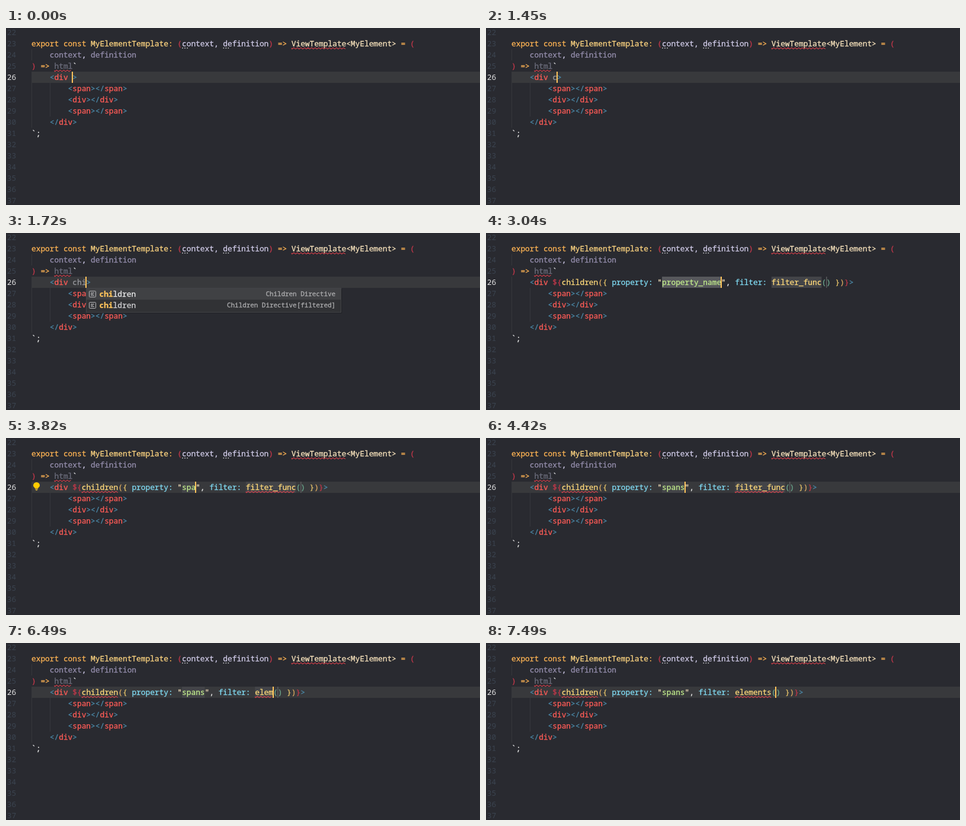
Animation of 800 by 300 pixels, one loop 8 s. Source, as an HTML page:

```html
<!DOCTYPE html>
<html lang="en">
<head>
<meta charset="utf-8">
<title>Snippet completion in a code editor</title>
<style>
  html, body { margin: 0; width: 100%; height: 100%; overflow: hidden; background: #292a30; }
  svg { display: block; }
  text {
    font: 12.83px "Noto Sans Mono", "DejaVu Sans Mono", monospace;
    font-variant-ligatures: none;
    white-space: pre;
  }
  text, tspan { fill: currentColor; stroke: currentColor; stroke-width: 0.3px; }
  .number { stroke: none; }
  .detail { font-size: 10.9px; text-anchor: end; }
</style>
</head>
<body>
<svg id="stage" width="800" height="300" viewBox="0 0 800 300">
  <g id="back"></g>
  <g id="page"></g>
  <g id="live"></g>
</svg>
<script>
const LOOP = 8000;
const LEFT = 43, CHAR = 7.698, ROW = 19, ACTIVE = 26;

const C = {
  number: '#3b4450', white: '#e6e6e6', keyword: '#ffb454', name: '#ffd580', type: '#f9e4bd',
  param: '#d0cbe8', dim: '#968fae', red: '#c2384a', tag: '#ff5c57',
  angle: '#4b89a8', faint: '#6c6d7c', typed: '#96979c', call: '#ffd97a',
  key: '#80dcf4', string: '#c1ec8c', paren: '#d9a860', brace: '#e8c56a',
  inner: '#6ba58c', caret: '#ffc55c', squiggle: '#e5404c'
};

const colX = col => LEFT + col * CHAR;
const rowY = line => 74 + (line - ACTIVE) * ROW;

const rect = (x, y, w, h, fill, more = '') =>
  `<rect x="${x}" y="${y}" width="${w}" height="${h}" fill="${fill}" ${more}/>`;
const escape = s => s.replace(/&/g, '&amp;').replace(/</g, '&lt;').replace(/>/g, '&gt;');

// parts: alternating colour and string
function codeLine(line, col, ...parts) {
  let spans = '';
  for (let i = 0; i < parts.length; i += 2)
    spans += `<tspan color="${C[parts[i]]}">${escape(parts[i + 1])}</tspan>`;
  return `<text x="${colX(col)}" y="${rowY(line) + 14}">${spans}</text>`;
}

function squiggle(line, col, length) {
  const x = colX(col), y = rowY(line) + 16, end = length * CHAR;
  let d = `M${x} ${y + 1}`;
  for (let i = 1, up = false; i < end; i += 3, up = !up)
    d += `L${x + i} ${y + (up ? 0.4 : 2.6)}`;
  return `<path d="${d}" fill="none" stroke="${C.squiggle}" stroke-width="1.1"/>`;
}

const hintDots = (line, col) => [1, 5, 9].map(dx =>
  `<circle cx="${colX(col) + dx}" cy="${rowY(line) + 17}" r="1" fill="#b4b4b8"/>`).join('');

const backing = (col, length, fill) =>
  rect(colX(col), rowY(ACTIVE), length * CHAR, ROW, fill);

function drawPage() {
  let out = '';
  for (let n = 22; n <= 37; n++)
    out += `<text class="number" x="1.7" y="${rowY(n) + 14}" color="${n === ACTIVE ? C.white : C.number}">${n}</text>`;
  out += codeLine(23, 0, 'keyword', 'export const ', 'name', 'MyElementTemplate', 'keyword', ': ',
    'red', '(', 'param', 'context, definition', 'red', ')', 'keyword', ' => ',
    'type', 'ViewTemplate<MyElement>', 'keyword', ' = ', 'red', '(');
  out += hintDots(23, 33) + hintDots(23, 42) + squiggle(23, 57, 12);
  out += codeLine(24, 4, 'dim', 'context', 'param', ', ', 'dim', 'definition');
  out += codeLine(25, 0, 'red', ')', 'keyword', ' => ', 'faint', 'html', 'white', '`') + squiggle(25, 5, 4);
  ['span', 'div', 'span'].forEach((tag, i) => {
    out += codeLine(27 + i, 8, 'angle', '<', 'tag', tag, 'angle', '></', 'tag', tag, 'angle', '>');
  });
  out += codeLine(30, 4, 'angle', '</', 'tag', 'div', 'angle', '>');
  return out + codeLine(31, 0, 'white', '`;');
}

function drawBack(s) {
  const guide = (x, line, rows) => rect(x, rowY(line), 1, rows * ROW, '#36373c');
  const highlight = s.select ? '' : rect(LEFT, 74, 757, ROW, '#38393c');
  return highlight + guide(43, 24, 1) + guide(43, 26, 5) + guide(74, 27, 3);
}

function drawPopup(x, typed, rows, selected) {
  const h = rows.length * ROW + 3;
  let out = rect(x + 1, 95, 431, h, '#000', 'opacity=".25"') +
    rect(x + 0.5, 93.5, 430, h, '#313235', 'stroke="#424347"');
  rows.forEach(([label, detail], i) => {
    const y = 94 + i * ROW;
    if (i === selected) out += rect(x + 1, y, 429, ROW, '#404144');
    out += rect(x + 5.5, y + 4.5, 11, 10, 'none', 'stroke="#bdbdbf" rx="1"') +
      `<path d="M${x + 8} ${y + 7.5}h6M${x + 8} ${y + 9.5}h4M${x + 8} ${y + 11.5}h6" stroke="#bdbdbf"/>`;
    out += `<text x="${x + 22.5}" y="${y + 13.5}" color="${i === selected ? '#ededed' : '#d4d4d6'}">` +
      `<tspan color="${C.caret}" font-weight="700">${label.slice(0, typed)}</tspan>${label.slice(typed)}</text>`;
    out += `<text class="detail" x="${x + 421}" y="${y + 13}" color="#adadaf">${detail}</text>`;
  });
  return out;
}

const bulb = () =>
  `<path d="M48.9 85.5C48.5 83.6 46 83.2 46 80.3A5.5 5.4 0 0 1 57 80.3C57 83.2 54.5 83.6 54.1 85.5Z" fill="#ffcc00"/>` +
  rect(49.2, 86, 4.6, 1.2, '#d8b43c') + rect(50, 87.7, 3, 1.3, '#d8b43c');

const directives = [['children', 'Children Directive'], ['children', 'Children Directive[filtered]']];
const words = ['class', 'click', 'color', 'const', 'content', 'context', 'cursor'].map(w => [w, '']);

function drawLive(s) {
  let out = '', caret;
  if (s.prop === undefined) {
    caret = 9 + s.typed.length;
    out += codeLine(ACTIVE, 4, 'angle', '<', 'tag', 'div ', 'typed', s.typed, 'angle', '>');
  } else {
    const propCol = 33, filterCol = propCol + s.prop.length + 11;
    const filterEnd = filterCol + s.filter.length;
    caret = { prop: propCol + s.prop.length, filter: filterEnd, end: filterEnd + 1 }[s.field];
    if (s.stops) {
      const shade = name => s.select && s.field === name ? '#57585c' : '#434448';
      out += backing(propCol, s.prop.length, shade('prop')) +
        backing(filterCol, s.filter.length, shade('filter')) +
        rect(Math.floor(colX(filterEnd + 1)), 74, 1.5, ROW, '#5a5b5c');
    }
    out += codeLine(ACTIVE, 4, 'angle', '<', 'tag', 'div ', 'red', '${', 'call', 'children',
      'paren', '(', 'brace', '{ ', 'key', 'property: ', 'type', '"', 'string', s.prop, 'type', '"',
      'white', ', ', 'key', 'filter: ', 'call', s.filter, 'inner', '()', 'brace', ' }',
      'paren', ')', 'red', '}', 'angle', '>');
    if (s.errors) out += squiggle(ACTIVE, 11, 8) + squiggle(ACTIVE, filterCol, s.filter.length);
  }
  if (s.caret) out += rect(Math.round(colX(caret)) - 1, 74, 2, ROW, C.caret);
  if (s.bulb) out += bulb();
  if (s.rows) out += drawPopup(Math.round(colX(caret)), s.typed.length, s.rows, s.selected);
  return out;
}

// Each step changes part of the state from its time on.
const steps = [
  [0, { typed: '', caret: true }],
  [260, { caret: false }],
  [720, { caret: true }],
  [1250, { caret: false }],
  [1450, { typed: 'c', caret: true }],
  [1520, { rows: [...directives, ...words], selected: 0 }],
  [1600, { typed: 'ch', rows: directives }],
  [1720, { typed: 'chi' }],
  [2250, { caret: false }],
  [2710, { caret: true, selected: 1 }],
  [3040, { rows: null, prop: 'property_name', filter: 'filter_func', field: 'prop', select: true, stops: true }],
  [3300, { prop: 's', select: false }],
  [3430, { prop: 'sp' }],
  [3560, { errors: true }],
  [3690, { bulb: true }],
  [3820, { prop: 'spa' }],
  [4020, { prop: 'span' }],
  [4150, { prop: 'spans' }],
  [4420, { bulb: false }],
  [4680, { caret: false }],
  [4950, { field: 'filter', select: true, caret: true }],
  [5220, { bulb: true }],
  [5420, { caret: false }],
  [5620, { filter: 'e', select: false, caret: true }],
  [5750, { filter: 'el' }],
  [6020, { bulb: false }],
  [6150, { filter: 'ele' }],
  [6490, { filter: 'elem' }],
  [6690, { filter: 'eleme' }],
  [6800, { filter: 'elemen' }],
  [6910, { filter: 'element' }],
  [7020, { filter: 'elements' }],
  [7420, { field: 'end' }],
  [7490, { stops: false }]
];

const part = id => document.getElementById(id);
let shown = -1;

function render(time) {
  const t = time % LOOP;
  const current = steps.filter(([at]) => at <= t);
  if (current.length === shown) return;
  shown = current.length;
  const state = Object.assign({}, ...current.map(([, change]) => change));
  part('back').innerHTML = drawBack(state);
  part('live').innerHTML = drawLive(state);
}

part('page').innerHTML = drawPage();
const start = performance.now();
function tick() {
  render(performance.now() - start);
  requestAnimationFrame(tick);
}
tick();
</script>
</body>
</html>
```
